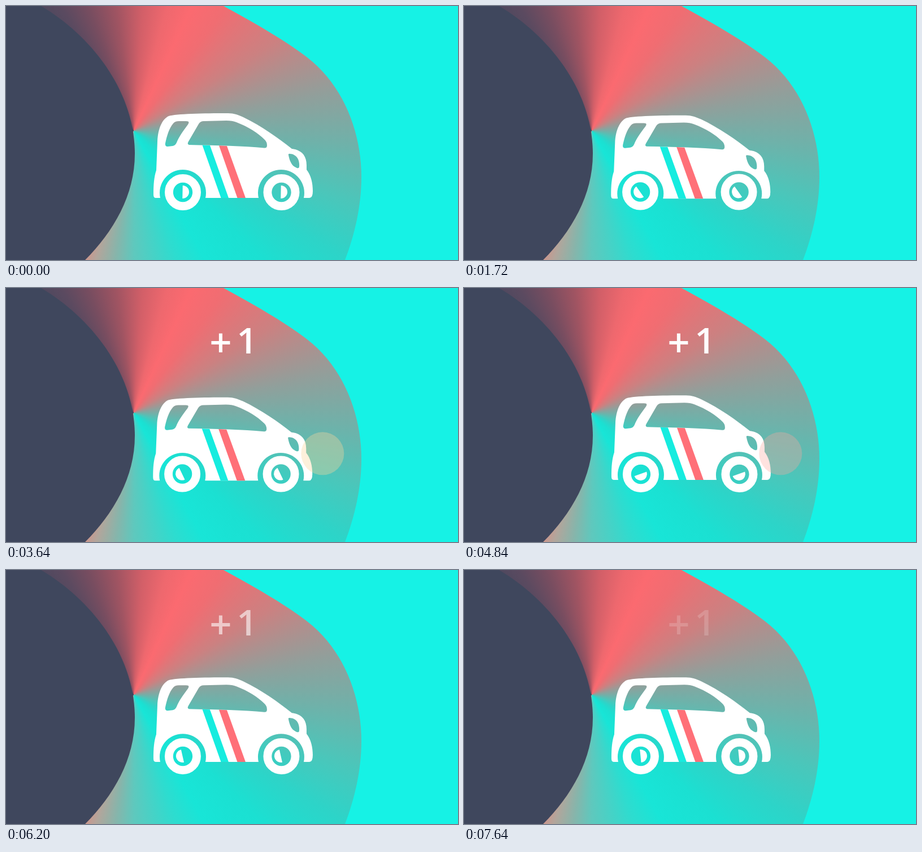
Animation, 800 px wide and 450 px high, one loop 7.68 s. Source, as an HTML page:

```html
<!DOCTYPE html>
<html lang="en">
<head>
<meta charset="utf-8">
<title>Car</title>
<style>
  html, body { margin: 0; width: 100%; height: 100%; overflow: hidden; background: #16f2e5; }
  #stage { position: relative; width: 800px; height: 450px; overflow: hidden; }
  #glow {
    position: absolute; inset: 0;
    clip-path: path("M55 0H385C440 30 494 61 533 91C598 141 629 225 629 303C629 355 617 405 600 450H130Z");
    background: conic-gradient(from 200deg at 226px 221px,
      #c8988f 0deg, #3f475d 30deg, #3f475d 114deg, #5b4a60 130deg, #784d60 140deg,
      #a05462 152deg, #d25f68 164deg, #ee686e 175deg, #fb6a70 185deg, #f06d72 197deg,
      #cb8181 218deg, #919f9b 239deg, #6eb2aa 254deg, #4bc6ba 268deg, #2dd4c8 281deg,
      #1be0d2 295deg, #18e5d7 311deg, #2edccf 322deg, #5fc8bd 340deg,
      #86b5ab 348deg, #b1a69c 356deg, #c8988f 360deg);
  }
  svg { position: absolute; inset: 0; }
  text { font-family: "Open Sans", "Noto Sans", sans-serif; font-weight: 600; fill: #fff; text-anchor: middle; }
</style>
</head>
<body>
<div id="stage">
  <div id="glow"></div>
  <svg width="800" height="450" viewBox="0 0 800 450">
    <defs>
      <circle id="tyre" r="24.600" fill="none" stroke="#fff" stroke-width="14.800"/>
      <path id="hub" d="M0 -11.500A11.500 11.500 0 0 1 0 11.500Z" fill="#fff"/>
    </defs>
    <path fill="#3f475d" d="M0 0H62C150 52 228 150 228 262C228 335 190 400 140 450H0Z"/>
    <g id="body">
      <path fill="#fff" fill-rule="evenodd" d="
        M265 340Q261 340 261 334C261 316 262 303 266 291L268 240C269 216 277 200 288 195
        C300 191 350 190 393 190C404 190 411 193 420 197C453 213 482 234 506 253
        C523 255 532 265 532 282V290C540 300 543 314 543 328Q543 340 537 340H527
        A41 41 0 1 0 447 340H353A41 41 0 1 0 273 340Z
        M286 249Q281 249 282 243C285 229 289 216 296 208Q299 204 306 204H319
        Q326 204 322 210C313 222 306 232 302 242Q300 247 295 248Z
        M324 246Q320 245 323 240L341 209Q344 204 350 204L390 203Q401 203 408 206
        C429 214 446 225 458 237Q462 241 462 247Q462 252 457 251.500C420 248 375 247 324 246Z
        M500 264Q499 261 504 262C514 263 520 272 519 284Q519 288 515 287C506 284 502 275 500 264Z"/>
      <path fill="#16ecdf" d="M347.500 246.500L361 247L394 340H380.500Z"/>
      <path fill="#ff7078" d="M377 247.300L391 248L424 340H409.500Z"/>
    </g>
    <g id="wheels">
      <use href="#tyre" x="313" y="330"/>
      <use href="#tyre" x="487.500" y="330"/>
      <g transform="translate(312.500 329.500)"><use class="spin" href="#hub"/></g>
      <g transform="translate(486.500 329.500)"><use class="spin" href="#hub"/></g>
    </g>
    <circle id="light" cx="560.300" cy="293.300" r="38"/>
    <g id="plus">
      <text x="380" y="122" font-size="69">+</text>
      <text x="426.500" y="116" font-size="64">1</text>
    </g>
  </svg>
</div>
<script>
const LOOP = 7680, BEAT = 480, SPIN = 1.13; // ms, ms, degrees per ms
const byId = id => document.getElementById(id);
const body = byId("body"), wheels = byId("wheels"), light = byId("light"), plus = byId("plus");
const hubs = document.querySelectorAll(".spin");

// Piecewise linear value through [time, value] points.
function track(points, t) {
  if (t <= points[0][0]) return points[0][1];
  for (let i = 1; i < points.length; i++) {
    const [t0, v0] = points[i - 1], [t1, v1] = points[i];
    if (t <= t1) return v0 + (v1 - v0) * (t - t0) / (t1 - t0);
  }
  return points[points.length - 1][1];
}

const lightAlpha = [[3200, 0], [3400, 0.36], [4840, 0.33], [5900, 0]];
const plusAlpha = [[3200, 0], [3400, 1], [4800, 1], [7680, 0.16]];
const warmth = [[3640, 0], [4840, 1]];

function draw(t) {
  const dip = (1 - Math.cos(2 * Math.PI * t / BEAT)) / 2;

  // The body squashes towards its lower edge as it dips.
  const squash = 1 - 0.017 * dip;
  const shiftY = 340 * (1 - squash) + 1.4 * dip;
  body.setAttribute("transform", `matrix(1 0 0 ${squash} ${-0.8 * dip} ${shiftY})`);
  wheels.setAttribute("transform", `translate(${-dip} ${-0.5 * dip})`);
  hubs.forEach(hub => hub.setAttribute("transform", `rotate(${SPIN * t})`));

  const pink = track(warmth, t);
  light.setAttribute("fill", `rgb(250, ${212 - 46 * pink}, ${155 + 3 * pink})`);
  light.setAttribute("opacity", track(lightAlpha, t));
  plus.setAttribute("opacity", track(plusAlpha, t));
}

const start = performance.now();
function tick() {
  draw((performance.now() - start) % LOOP);
  requestAnimationFrame(tick);
}
tick();
</script>
</body>
</html>
```
